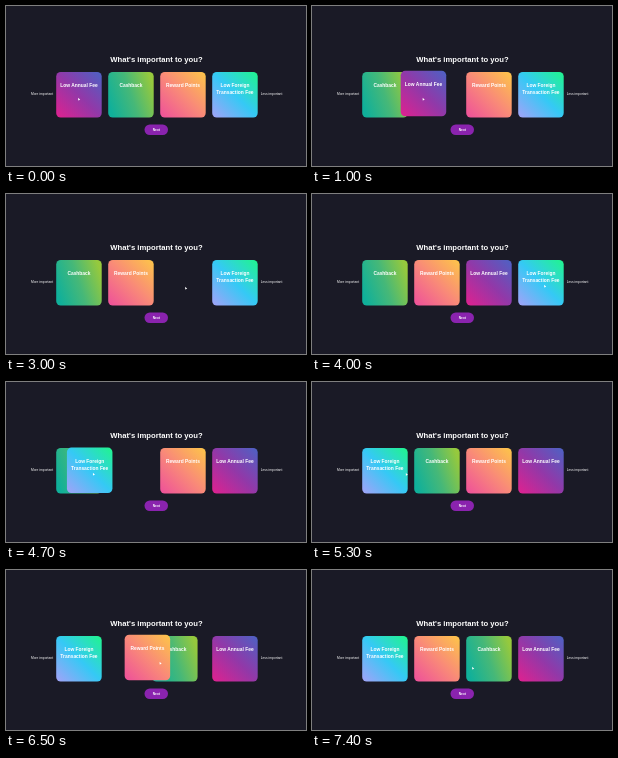
These frames come from a looping animation (300 by 160 pixels, 7800 ms). An HTML page with a canvas:

```html
<!DOCTYPE html>
<html lang="en">
<head>
<meta charset="utf-8">
<title>Card ranking</title>
<style>
html, body { margin: 0; width: 100%; height: 100%; overflow: hidden; background: #1a1a26; }
canvas { display: block; }
</style>
</head>
<body>
<canvas id="stage"></canvas>
<script>
const LOOP = 7800, STEP = 100;
const SIZE = 45.5, TOP = 66, LEFT = 50.2, GAP = 52;
const canvas = document.getElementById('stage');
const ctx = canvas.getContext('2d');
const scale = window.devicePixelRatio || 1;
canvas.width = 300 * scale;
canvas.height = 160 * scale;
canvas.style.width = '300px';
canvas.style.height = '160px';

// Each move: start ms, end ms, target slot, dragged by the pointer
const cards = [
  { lines: ['Low Annual Fee'], colors: ['#e0218f', '#9238a8', '#4c62c4'], slot: 0,
    moves: [[400, 1300, 1, true], [2300, 2900, 2, true], [4300, 4500, 3]], hidden: [2950, 3050] },
  { lines: ['Cashback'], colors: ['#10b09a', '#46b878', '#96c93d'], flat: true, slot: 1,
    moves: [[800, 1000, 0], [4720, 4920, 1], [6350, 6550, 2]] },
  { lines: ['Reward Points'], colors: ['#ee4f9b', '#f98a78', '#fdc648'], slot: 2,
    moves: [[2500, 2700, 1], [4400, 4600, 2], [6000, 6800, 1, true]] },
  { lines: ['Low Foreign', 'Transaction Fee'], colors: ['#a3a2f8', '#35c9f5', '#20f58c'], slot: 3,
    moves: [[4150, 4805, 0, true]] }
];

// Pointer stops: ms, x, y
const pointerPath = [
  [0, 73, 93], [400, 73, 93], [1300, 125, 93], [1800, 95, 90], [2300, 128, 94],
  [2900, 180, 94], [3100, 180, 94], [4000, 233, 92], [4150, 233, 92], [4805, 77, 92],
  [5100, 77, 92], [5900, 190, 93], [6000, 190, 93], [6800, 138, 93], [7400, 161, 98]
];

function ease(t, start, end) {
  const p = Math.min(1, Math.max(0, (t - start) / (end - start)));
  return p * p * (3 - 2 * p);
}

function text(str, x, y, size, weight = 'bold') {
  ctx.font = `${weight} ${size}px "Liberation Sans", Arial, sans-serif`;
  ctx.fillStyle = '#fff';
  ctx.fillText(str, x, y);
}

function box(x, y, w, h, r, fill) {
  ctx.fillStyle = fill;
  ctx.beginPath();
  ctx.roundRect(x, y, w, h, r);
  ctx.fill();
}

function pose(card, t) {
  let slot = card.slot, lift = 0;
  for (const [start, end, target, drag] of card.moves) {
    const p = ease(t, start, end);
    slot += (target - slot) * p;
    if (drag) lift += Math.min(1.2, 6 * p * (1 - p));
  }
  return { card, lift, x: LEFT + GAP * slot, y: TOP - lift };
}

function drawCard({ card, x, y }) {
  const fill = ctx.createLinearGradient(x, card.flat ? y + 30 : y + SIZE, x + SIZE, card.flat ? y + 15 : y);
  card.colors.forEach((color, i) => fill.addColorStop(i / 2, color));
  box(x, y, SIZE, SIZE, 4.5, fill);
  card.lines.forEach((line, i) => text(line, x + SIZE / 2, y + 15 + 7 * i, 4.9));
}

function drawPointer(t) {
  let [, x, y] = pointerPath[0];
  for (let i = 1; i < pointerPath.length; i++) {
    const [end, toX, toY] = pointerPath[i];
    const p = ease(t, pointerPath[i - 1][0], end);
    x += (toX - x) * p;
    y += (toY - y) * p;
  }
  ctx.fillStyle = '#fff';
  ctx.beginPath();
  ctx.moveTo(x - 0.8, y - 1.2);
  ctx.lineTo(x - 0.8, y + 1.5);
  ctx.lineTo(x + 1.2, y + 0.7);
  ctx.fill();
}

function draw(now) {
  const t = Math.floor(now % LOOP / STEP) * STEP;
  ctx.setTransform(scale, 0, 0, scale, 0, 0);
  ctx.fillStyle = '#1a1a26';
  ctx.fillRect(0, 0, 300, 160);
  ctx.textAlign = 'center';
  text("What's important to you?", 150.5, 56, 7.7);
  text('More important', 36, 88.6, 3.3, 'normal');
  text('Less important', 265.5, 88.6, 3.3, 'normal');
  box(138.5, 118.5, 23.5, 10.5, 5.25, '#8a23ae');
  text('Next', 150.3, 125, 3.3);

  cards.filter(({ hidden }) => !hidden || t < hidden[0] || t > hidden[1])
    .map(card => pose(card, t))
    .sort((a, b) => a.lift - b.lift)
    .forEach(drawCard);
  drawPointer(t);
}

const origin = performance.now();
function tick() {
  draw(performance.now() - origin);
  requestAnimationFrame(tick);
}
tick();
</script>
</body>
</html>
```
